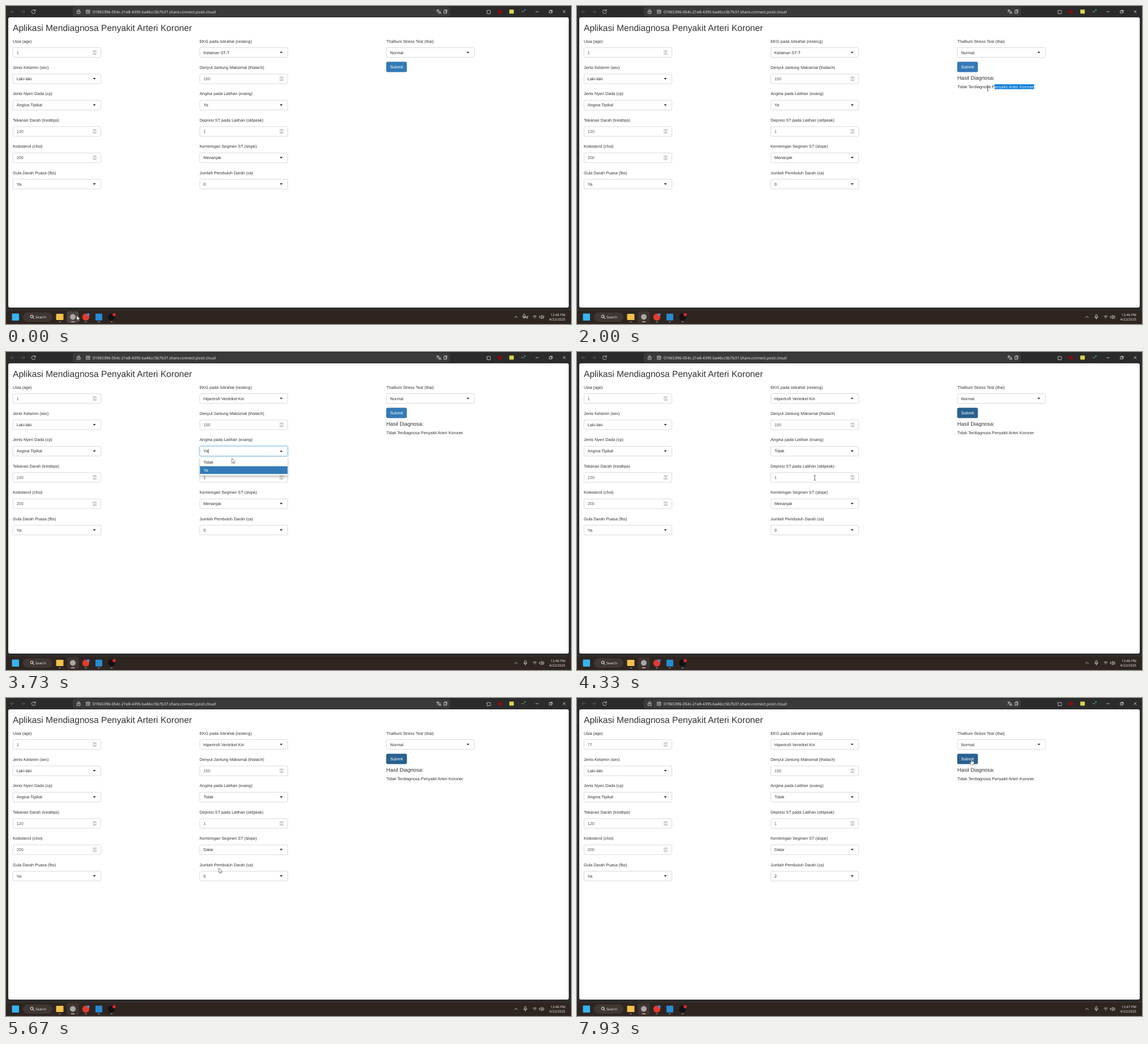
An HTML page that plays this animation: 998x561 px, repeating every 8 s.

```html
<!DOCTYPE html>
<html lang="id">
<head>
<meta charset="utf-8">
<title>Aplikasi Mendiagnosa Penyakit Arteri Koroner</title>
<style>
  html, body { margin: 0; width: 100%; height: 100%; overflow: hidden; background: #2b2b2b; }
  svg { display: block; width: 100vw; height: 100vh; }
  text { font: 7.28px "Liberation Sans", Arial, sans-serif; fill: #333; text-rendering: geometricPrecision; white-space: pre; }
  .ui { font-family: "Open Sans", "Noto Sans", sans-serif; font-size: 6px; fill: #f2f2f2; }
  .line { fill: none; stroke: #ddd; stroke-width: .8; stroke-linecap: round; stroke-linejoin: round; }
</style>
</head>
<body>
<svg id="stage" viewBox="0 0 998 561" xmlns="http://www.w3.org/2000/svg">
  <defs>
    <filter id="glow" x="-10%" y="-60%" width="120%" height="220%"><feGaussianBlur stdDeviation="1.5"/></filter>
    <filter id="drop" x="-10%" y="-30%" width="120%" height="180%"><feDropShadow dx="0" dy="2.5" stdDeviation="2.2" flood-opacity=".25"/></filter>
    <clipPath id="selClip"><rect id="clipBox" y="136" height="12"/></clipPath>
  </defs>
  <rect width="998" height="561" fill="#2b2b2b"/>
  <g id="browser"></g>
  <rect x="4" y="20" width="990" height="512" rx="3" fill="#fff"/>
  <g id="page"></g>
  <g id="taskbar"></g>
  <g id="cursor"></g>
</svg>
<script>
const NS = 'http://www.w3.org/2000/svg';
const LOOP = 8000, ROW = 13.65, BOX_W = 155.9, BOX_H = 17.7;
const $ = id => document.getElementById(id);

function add(parent, tag, attrs = {}, content) {
  const el = document.createElementNS(NS, tag);
  for (const k in attrs) el.setAttribute(k, attrs[k]);
  if (content !== undefined) el.textContent = content;
  return parent.appendChild(el);
}
const rect = (p, x, y, width, height, fill, rx = 0, more = {}) =>
  add(p, 'rect', { x, y, width, height, fill, rx, ...more });
const disc = (p, cx, cy, r, fill) => add(p, 'circle', { cx, cy, r, fill });
const label = (p, x, y, str, more = {}) => add(p, 'text', { x, y, ...more }, str);
const line = (p, d, more = {}) => add(p, 'path', { d, class: 'line', ...more });
const show = (el, on) => el.setAttribute('visibility', on ? 'visible' : 'hidden');
const between = (t, a, b) => t >= a && t < b;
const clamp = v => Math.max(0, Math.min(1, v));

// Browser bar
const bar = $('browser');
rect(bar, 118, 1.5, 666, 17, '#3a3a3a', 4);
line(bar, 'M14.5 10H8.5M11 7.5 8.5 10 11 12.5', { stroke: '#666', style: 'stroke:#666' });
line(bar, 'M27 10h6M30.5 7.5 33 10 30.5 12.5', { style: 'stroke:#666' });
line(bar, 'M51.6 8.2A3.4 3.4 0 1 0 52 11M52 6.3V8.7H49.6');
line(bar, 'M125.8 9.2h5.2v4h-5.2zM126.9 9V7.9a1.5 1.5 0 0 1 3 0V9M128.4 10.8v.8');
line(bar, 'M142.2 7.2h5.6v5.8h-5.6zM142.2 9h5.6M144 11h2.2');
label(bar, 153, 12.7, '01965396-054c-21e8-4395-ba46cc5b7b37.share.connect.posit.cloud',
  { class: 'ui', style: 'font-size:6.88px' });
line(bar, 'M760.6 7.4h4.4M762.8 6.4v1M764 7.4c-.5 2-1.7 3-3.2 3.7M761.6 8.5c.5 1 1.5 1.8 2.5 2.2M764.4 13.6l2-4.8 2 4.8M765.1 12.2h2.6');
line(bar, 'M773.6 8.2v5.3l2-1.4 2 1.4V8.2zM774.8 6.8h4v5');
line(bar, 'M849.6 8.2h1.8a1.2 1.2 0 0 1 2.3 0h1.8v2a1.2 1.2 0 0 1 0 2.2v1.2h-5.9v-1.3a1.2 1.2 0 0 0 0-2.2z');
disc(bar, 872.3, 10, 3.6, '#8c0b12');
rect(bar, 889, 6.2, 8, 7.2, '#d8d24c', 1);
[911.5, 914, 916.5].forEach((x, i) => disc(bar, x, i === 2 ? 7 : 10, i === 2 ? 1.2 : .7, i === 2 ? '#35c4a0' : '#ddd'));
line(bar, 'M935.8 10h4.6M960 8.6h3.8v3.8H960zM961.2 8.4V7.4h3.8v3.8h-1M984 7.8l4 4.2M988 7.8l-4 4.2');

// Form
const page = $('page');
const cols = [12, 342, 671.8];
const fields = {};
label(page, 12, 44.4, 'Aplikasi Mendiagnosa Penyakit Arteri Koroner', { style: 'font-size:15.6px' });

function field(id, col, row, name, value, numeric) {
  const x = cols[col], cy = 82.05 + row * 46.42, y = cy - BOX_H / 2;
  label(page, x, cy - 17.5, name);
  const glow = rect(page, x - .3, y - .3, BOX_W + .6, BOX_H + .6, '#66afe9', 2.4, { filter: 'url(#glow)', opacity: 0 });
  const box = rect(page, x + .3, y + .3, BOX_W - .6, BOX_H - .6, '#fff', 2, { stroke: '#c6c6c6', 'stroke-width': .65 });
  const mark = rect(page, x + 6.4, cy - 4, 4.4, 8, '#0078d7', 0, { visibility: 'hidden' });
  const text = label(page, x + 6.7, cy + 2.6, value, numeric ? { style: 'fill:#555' } : {});
  let arrow;
  if (numeric) {
    rect(page, x + 140.3, cy - 4.8, 8.6, 9.6, '#ececec', 1);
    line(page, `M${x + 143} ${cy - 1.6}l1.6-1.7 1.6 1.7M${x + 143} ${cy + 1.6}l1.6 1.7 1.6-1.7`, { style: 'stroke:#666;stroke-width:.7' });
  } else {
    arrow = add(page, 'path', { fill: '#222' });
  }
  const caret = rect(page, 0, cy - 4, .6, 8, '#222', 0, { visibility: 'hidden' });
  fields[id] = { x, cy, glow, box, mark, text, arrow, caret, numeric, value };
}
field('age', 0, 0, 'Usia (age)', '1', true);
field('sex', 0, 1, 'Jenis Kelamin (sex)', 'Laki-laki');
field('cp', 0, 2, 'Jenis Nyeri Dada (cp)', 'Angina Tipikal');
field('bps', 0, 3, 'Tekanan Darah (trestbps)', '120', true);
field('chol', 0, 4, 'Kolesterol (chol)'.replace('chol)', 'choi)'), '200', true);
field('fbs', 0, 5, 'Gula Darah Puasa (fbs)', 'Ya');
field('ecg', 1, 0, 'EKG pada Istirahat (restecg)', 'Kelainan ST-T');
field('rate', 1, 1, 'Denyut Jantung Maksimal (thalach)', '150', true);
field('exang', 1, 2, 'Angina pada Latihan (exang)', 'Ya');
field('peak', 1, 3, 'Depresi ST pada Latihan (oldpeak)', '1', true);
field('slope', 1, 4, 'Kemiringan Segmen ST (slope)', 'Menanjak');
field('ca', 1, 5, 'Jumlah Pembuluh Darah (ca)', '0');
field('thal', 2, 0, 'Thallium Stress Test (thai)', 'Normal');

const submit = rect(page, 671.9, 98.7, 35.9, 17.5, '#337ab7', 2, { stroke: '#2e6da4', 'stroke-width': .6 });
label(page, 689.8, 110.1, 'Submit', { 'text-anchor': 'middle', style: 'fill:#fff' });

const RESULT = 'Tidak Terdiagnosa Penyakit Arteri Koroner';
const result = add(page, 'g');
label(result, 671.8, 130, 'Hasil Diagnosa:', { style: 'font-size:9.36px' });
const verdict = label(result, 671.8, 145, RESULT);
const picked = add(result, 'g', { 'clip-path': 'url(#selClip)' });
rect(picked, 670, 138.2, 142, 8.4, '#0078d7');
label(picked, 671.8, 145, RESULT, { style: 'fill:#fff' });

// Dropdown menus: open and close times, options, chosen index before and after
const menus = [
  { id: 'ecg', open: 2740, close: 3110, items: ['Normal', 'Kelainan ST-T', 'Hipertrofi Ventrikel Kiri'], from: 1, to: 2 },
  { id: 'exang', open: 3470, close: 3940, items: ['Tidak', 'Ya'], from: 1, to: 0 },
  { id: 'slope', open: 4820, close: 5350, items: ['Menanjak', 'Datar', 'Menurun'], from: 0, to: 1 },
  { id: 'ca', open: 5970, close: 6340, items: ['0', '1', '2', '3'], from: 0, to: 2 }
];
for (const m of menus) {
  const { x, cy } = fields[m.id];
  m.top = cy + 13;
  m.group = add(page, 'g');
  rect(m.group, x + .4, m.top - 2.7, BOX_W - .8, m.items.length * ROW + 5.2, '#fff', 1.5,
    { stroke: '#d0d0d0', 'stroke-width': .5, filter: 'url(#drop)' });
  m.hover = rect(m.group, x + .6, m.top, BOX_W - 1.2, ROW, '#337ab7');
  m.labels = m.items.map((s, i) => label(m.group, x + 6.7, m.top + i * ROW + 9.4, s));
}

// Taskbar
const task = $('taskbar');
rect(task, 0, 536.5, 998, 24.5, '#2e2521');
rect(task, 0, 536.3, 998, .6, '#443b37');
rect(task, 10.5, 542.5, 12.5, 12.5, '#35b4f2', 1);
rect(task, 30, 540.5, 52, 16.5, '#3f3733', 8.2);
line(task, 'M47.4 549.4l2 2.2M48 547.6a2.4 2.4 0 1 1-4.8 0 2.4 2.4 0 0 1 4.8 0', { style: 'stroke:#fff;stroke-width:1' });
label(task, 52, 551, 'Search', { class: 'ui' });
const hoverTile = rect(task, 107.5, 538.5, 21, 20.5, '#4d4541', 2.5);
rect(task, 88.5, 543, 13, 11, '#f3c04b', 1);
disc(task, 118, 548.5, 5, '#aaa6a8');
disc(task, 141, 548.8, 6.2, '#e23b2e');
disc(task, 145.3, 544.5, 2.3, '#4c8fe0');
rect(task, 158, 542.7, 12, 12, '#268bd2', 1);
disc(task, 186.5, 548.6, 6.2, '#121214');
disc(task, 191, 544.6, 2.8, '#e0262c');
for (const x of [95, 141, 164, 186.5]) rect(task, x - 1.7, 556.7, 3.4, 1.3, '#a39d9a', .6);
rect(task, 114.8, 556.5, 6.4, 1.5, '#d8b5b0', .7);
line(task, 'M898.3 549.8l2.5-2.6 2.5 2.6');
const mic = add(task, 'g');
line(mic, 'M916 545.6a1.4 1.4 0 0 1 2.8 0v2.6a1.4 1.4 0 0 1-2.8 0zM914.7 548a2.7 2.7 0 0 0 5.4 0M917.4 550.8v1.6');
const locate = line(task, 'M917.6 549l4.6-2-1.8 4.6-.9-1.8z');
line(task, 'M931 547.3q3-2.6 6 0M932.2 549q1.8-1.5 3.6 0M934 551.2v.1');
line(task, 'M942.6 547.4h1.6l2.2-1.9v6.4l-2.2-1.9h-1.6zM948 547.2q1 1.5 0 3M949.4 546q1.9 2.7 0 5.4');
const clock = label(task, 988, 546.8, '', { class: 'ui', 'text-anchor': 'end' });
label(task, 988, 555, '4/22/2025', { class: 'ui', 'text-anchor': 'end' });

// Pointer shapes, each with its hot spot at the origin
const pointer = $('cursor');
const ink = { fill: '#fff', stroke: '#333', 'stroke-width': .6, 'stroke-linejoin': 'round' };
const shapes = {
  arrow: add(pointer, 'path', { d: 'M0 0V8.4L1.9 6.7 3.2 9.6 4.5 9 3.2 6.2H5.9Z', ...ink }),
  beam: add(pointer, 'path', { d: 'M-1.8-4.2H-.4L0-3.8.4-4.2H1.8M0-3.8V3.8M-1.8 4.2H-.4L0 3.8.4 4.2H1.8', fill: 'none', stroke: '#222', 'stroke-width': .7 }),
  hand: add(pointer, 'path', { d: 'M-.8.6Q0-.6.8.6V3.6L3.8 4.3Q4.6 4.6 4.5 5.6L3.7 9.6H-1L-3.4 6.2Q-3.4 4.9-2.2 5.3L-.8 6.4Z', ...ink })
};

const path = [
  [0, 125, 546], [80, 125, 546], [850, 691, 110], [1080, 691, 110], [1450, 809, 145], [1600, 809, 145],
  [2300, 672, 145], [2380, 672, 145], [2700, 440, 83], [2780, 440, 84], [3040, 400, 130], [3130, 400, 130],
  [3420, 400, 176], [3600, 400, 176], [3850, 398, 198], [4000, 398, 198], [4280, 420, 222], [4400, 420, 222],
  [4780, 475, 264], [4900, 475, 264], [5240, 376, 300], [5720, 376, 300], [5940, 376, 315], [6000, 376, 315],
  [6270, 376, 362], [6380, 376, 362], [6880, 112, 82], [6950, 112, 82], [7150, 4, 84], [7440, 4, 84],
  [7780, 697, 108], [8000, 697, 108]
];
function position(t) {
  const i = Math.max(1, path.findIndex(p => p[0] > t));
  const [t0, x0, y0] = path[i - 1], [t1, x1, y1] = path[i];
  const u = clamp((t - t0) / (t1 - t0)), s = u * u * (3 - 2 * u);
  return [x0 + (x1 - x0) * s, y0 + (y1 - y0) * s];
}

function pointerKind(t, x, y, openMenu) {
  if (between(t, 1600, 2300) || between(t, 6900, 7440)) return 'beam';
  if (x > 671 && x < 708 && y > 98 && y < 117) return 'hand';
  if (t > 1130 && x > 671 && x < 810 && y > 137 && y < 149) return 'beam';
  for (const id in fields) {
    const f = fields[id];
    if (x < f.x || x > f.x + BOX_W || Math.abs(y - f.cy) > BOX_H / 2) continue;
    if (openMenu && openMenu.id !== id && y > openMenu.top - 3) continue;
    if (f.numeric) return x < f.x + 140 ? 'beam' : 'arrow';
    return openMenu && openMenu.id === id ? 'beam' : 'hand';
  }
  return 'arrow';
}

// Share of focus glow for a span, with a short fade at both ends
const fade = (t, on, off) => clamp((t - on) / 150) * (1 - clamp((t - off) / 150));

function setFocus(f, amount) {
  f.glow.setAttribute('opacity', amount * .65);
  f.box.setAttribute('stroke', amount > .4 ? '#66afe9' : '#c6c6c6');
}

function draw(t) {
  const [x, y] = position(t);
  const openMenu = menus.find(m => between(t, m.open, m.close));

  for (const id in fields) {
    const f = fields[id], open = openMenu && openMenu.id === id;
    if (f.arrow) f.arrow.setAttribute('d', `M${f.x + 141.5} ${f.cy + (open ? 1.2 : -1.4)}h5.2l-2.6 ${open ? -2.7 : 2.7}z`);
    show(f.caret, open);
  }
  for (const m of menus) {
    const f = fields[m.id], open = m === openMenu;
    show(m.group, open);
    f.text.textContent = m.items[t < m.close ? m.from : m.to];
    setFocus(f, open ? fade(t, m.open - 100, m.close) : 0);
    if (!open) continue;
    f.caret.setAttribute('x', f.x + 7 + f.text.getComputedTextLength());
    const over = Math.floor((y - m.top) / ROW);
    const active = over >= 0 && over < m.items.length ? over : m.from;
    m.hover.setAttribute('y', m.top + active * ROW);
    m.labels.forEach((l, i) => l.style.fill = i === active ? '#fff' : '#333');
  }

  setFocus(fields.peak, fade(t, 4340, 4820));
  setFocus(fields.age, fade(t, 6920, 7780));
  const age = fields.age, marked = between(t, 7100, 7250);
  age.text.textContent = t < 7250 ? '1' : t < 7390 ? '7' : '77';
  age.text.style.fill = marked ? '#fff' : '#555';
  show(age.mark, marked);
  if (between(t, 7250, 7780)) {
    show(age.caret, true);
    age.caret.setAttribute('x', age.x + 7 + age.text.getComputedTextLength());
  }

  const kind = pointerKind(t, x, y, openMenu);
  const lit = kind === 'hand' && x > 671 && y > 98 ||
    [[1000, 1600], [3110, 3470], [3940, 4340], [5350, 5970], [6340, 6920]].some(s => between(t, ...s));
  submit.setAttribute('fill', lit ? '#286090' : '#337ab7');
  submit.setAttribute('stroke', lit ? '#204d74' : '#2e6da4');

  show(result, t >= 1130);
  const selecting = between(t, 1600, 2740);
  show(picked, selecting);
  if (selecting) {
    const lag = position(t - 45)[0];
    let start = 671.8 + verdict.getComputedTextLength();
    for (let i = 0; i < RESULT.length; i++) {
      const cx = verdict.getStartPositionOfChar(i).x;
      if (cx >= lag - 1.5) { start = cx; break; }
    }
    $('clipBox').setAttribute('x', start);
    $('clipBox').setAttribute('width', Math.max(0, 671.8 + verdict.getComputedTextLength() - start));
  }

  hoverTile.setAttribute('opacity', y > 537 ? 1 : .5);
  show(locate, t < 870);
  mic.setAttribute('transform', t < 870 ? 'translate(-2.2 -.8)' : '');
  clock.textContent = t < 6500 ? '12:46 PM' : '12:47 PM';

  for (const k in shapes) show(shapes[k], k === kind);
  pointer.setAttribute('transform', `translate(${x} ${y})`);
}

const begin = performance.now();
function tick() {
  draw((performance.now() - begin) % LOOP);
  requestAnimationFrame(tick);
}
draw(0);
requestAnimationFrame(tick);
</script>
</body>
</html>
```
